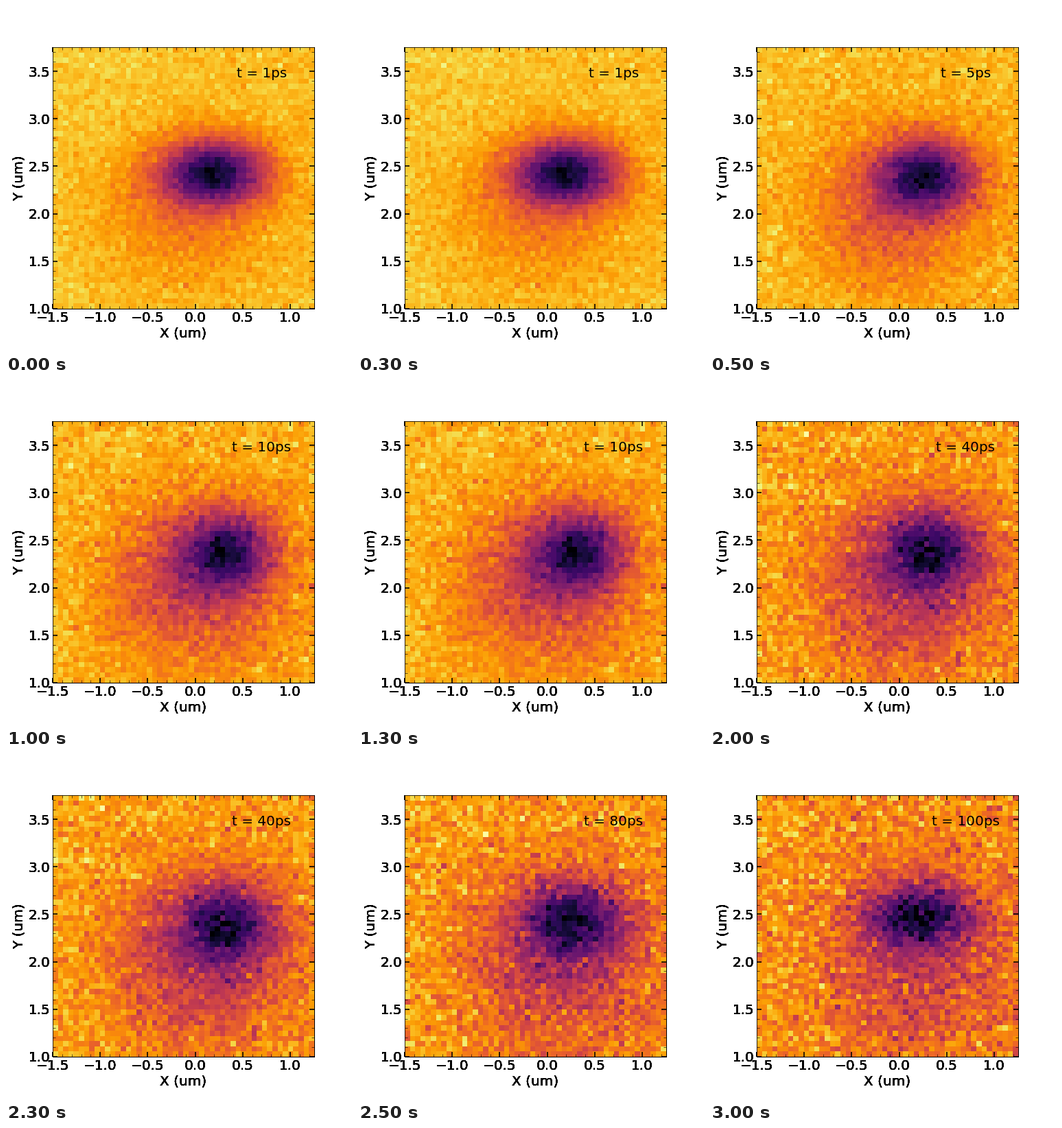
A matplotlib script that plays this animation: 504x504 px, repeating every 3500 ms.

```python
import numpy as np
import matplotlib.pyplot as plt
from matplotlib.animation import FuncAnimation
from matplotlib.ticker import AutoMinorLocator, MultipleLocator

DELAYS = (1, 5, 10, 15, 40, 80, 100)
CELLS = 50
LAYERS = 8
X_RANGE = (-1.5, 1.25)
Y_RANGE = (1.0, 3.75)
RECT = [0.135, 0.125, 0.755, 0.755]


def centers(lo, hi):
    step = (hi - lo) / CELLS
    return lo + step * (np.arange(CELLS) + 0.5)


X, Y = np.meshgrid(centers(*X_RANGE), centers(*Y_RANGE))


def bump(x, y, sx, sy):
    return np.exp(-0.5 * (((X - x) / sx) ** 2 + ((Y - y) / sy) ** 2))


def signal(i):
    """A narrow dip that drifts out and back, over a halo that spreads."""
    u = i / (len(DELAYS) - 1)
    swing = np.sin(np.pi * u)
    base = 0.86 - 0.09 * u
    spread = 0.16 + 0.07 * u + 0.12 * swing
    dip = bump(0.21 + 0.15 * swing, 2.43 + 0.06 * u - 0.08 * swing,
               0.38 - 0.05 * swing, 0.24 + 0.05 * swing)
    halo = bump(-0.15 + 0.32 * u, 2.05 - 0.05 * u,
                0.60 + 0.12 * u, 0.55 + 0.18 * u)
    grain = np.random.default_rng(40 + i).normal(0, 0.032 + 0.048 * u, X.shape)
    field = base - 0.01 * X - (base - spread) * dip - spread * halo
    return np.clip(field + grain, 0, 1)


def add_axes(fig, layer):
    ax = fig.add_axes(RECT, label=f"layer{layer}", facecolor="none")
    ax.set(xlim=X_RANGE, ylim=Y_RANGE, xlabel="X (um)", ylabel="Y (um)")
    for axis in (ax.xaxis, ax.yaxis):
        axis.set_major_locator(MultipleLocator(0.5))
        axis.set_minor_locator(AutoMinorLocator(5))
    ax.tick_params(which="both", direction="in", top=True, right=True)
    ax.tick_params(which="major", length=7, width=1.6)
    ax.tick_params(which="minor", length=4, width=0.6)
    return ax


plt.rcParams.update({"font.family": "DejaVu Sans", "font.size": 20,
                     "axes.labelsize": 20, "xtick.labelsize": 20,
                     "ytick.labelsize": 20})
fig = plt.figure(figsize=(7, 7), dpi=72, facecolor="white")

# stacked axes make the outer labels heavy; the top one holds the map
ax = [add_axes(fig, k) for k in range(LAYERS)][-1]
image = ax.imshow(signal(0), cmap="inferno", vmin=0, vmax=1,
                  origin="lower", extent=X_RANGE + Y_RANGE,
                  interpolation="nearest", aspect="auto")
label = ax.text(0.8, 0.9, "", ha="center", va="center",
                transform=ax.transAxes)


def update(i):
    image.set_data(signal(i))
    label.set_text(f"t = {DELAYS[i]}ps")
    return image, label


anim = FuncAnimation(fig, update, frames=len(DELAYS), interval=500,
                     repeat=True, repeat_delay=0, blit=False)
plt.show()
```
